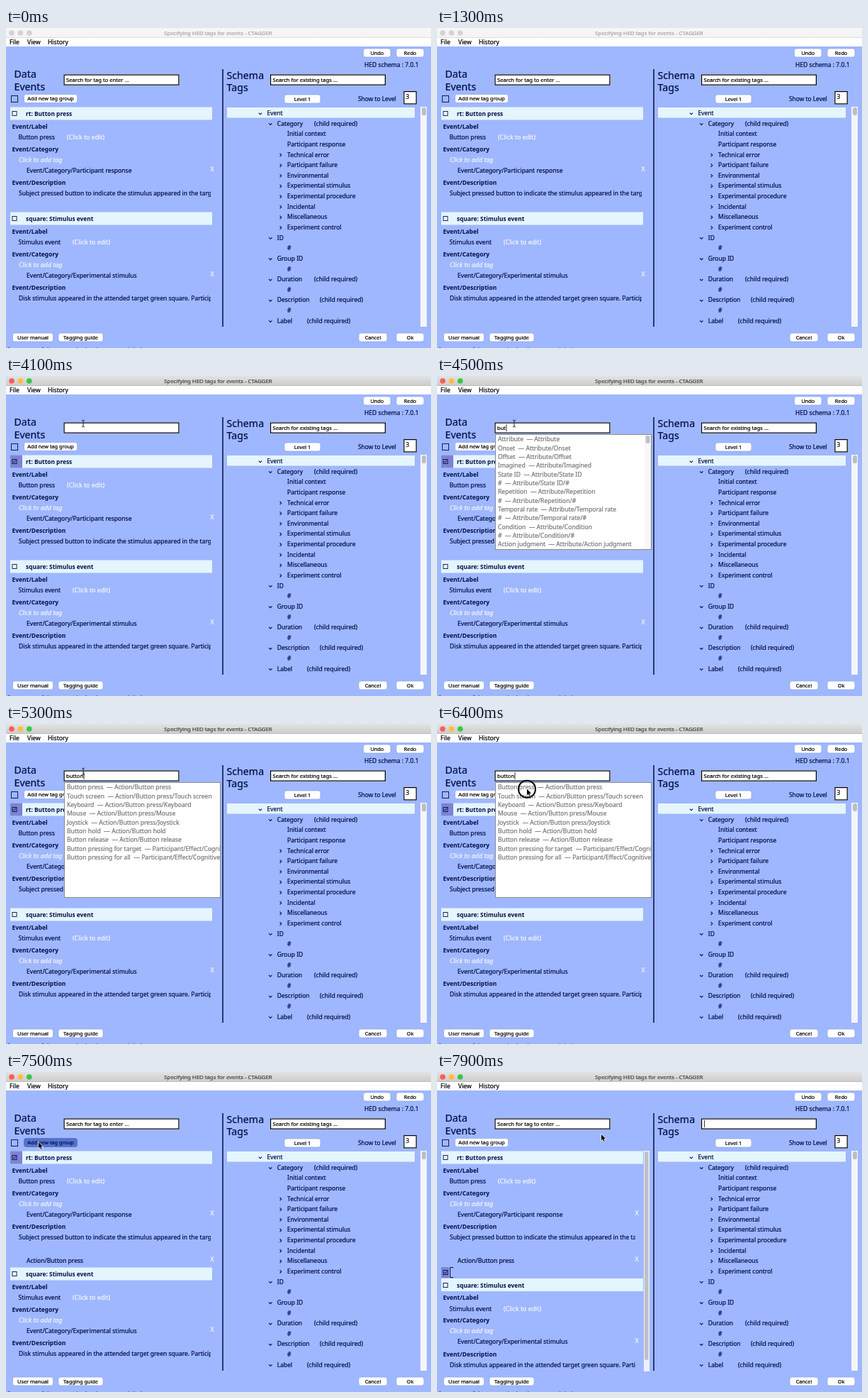
An HTML page with a canvas for the animation above (8 s loop, 600x451 px).

```html
<!DOCTYPE html>
<html lang="en">
<head>
<meta charset="utf-8">
<title>Tagging events</title>
<style>
html, body { margin: 0; width: 100%; height: 100%; overflow: hidden; background: #9fb7ff; }
canvas { display: block; }
</style>
</head>
<body>
<canvas id="stage" width="600" height="451"></canvas>
<script>
const ctx = document.getElementById('stage').getContext('2d');
const LOOP = 8000, STEP = 100;
const BLUE = '#9fb7ff', NAVY = '#000f48', PALE = '#e5f5fe', MARK = '#7d83d4', SOFT = '#f4f7ff';

// Moments in ms at which the interface changes
const AT = { active: 1900, check: 2000, focusLeft: 3300, popup: 4400, ripple: 6300,
             choose: 6500, press: 7500, group: 7600, focusRight: 7700 };
const TYPING = [[4200, 'b'], [4300, 'bu'], [4400, 'but'], [4700, 'butt'], [4900, 'butto'], [5000, 'button']];
const POINTER = [[1000, -30, 160], [1800, 12, 121], [2000, 12, 121], [2200, -5, 125], [2500, -5, 125],
                 [3200, 109, 67], [5300, 109, 67], [6100, 127, 91.7], [6800, 127, 91.7],
                 [7400, 46, 99], [7600, 46, 99], [7900, 232, 88]];

const twin = name => `${name}  — Attribute/${name}`;
const BROAD = ['Attribute  — Attribute',
  ...['Onset', 'Offset', 'Imagined', 'State ID'].map(twin),
  '#  — Attribute/State ID/#', twin('Repetition'), '#  — Attribute/Repetition/#',
  twin('Temporal rate'), '#  — Attribute/Temporal rate/#',
  twin('Condition'), '#  — Attribute/Condition/#', twin('Action judgment')];
const NARROW = ['Button press  — Action/Button press',
  ...['Touch screen', 'Keyboard', 'Mouse', 'Joystick'].map(n => `${n}  — Action/Button press/${n}`),
  'Button hold  — Action/Button hold', 'Button release  — Action/Button release',
  'Button pressing for target  — Participant/Effect/Cognitive',
  'Button pressing for all  — Participant/Effect/Cognitive'];

// Tree rows: depth, open state (v open, > closed, blank leaf), label, x of the note
const TREE = [[0, 'v', 'Event'], [1, 'v', 'Category', 435],
  [2, '', 'Initial context'], [2, '', 'Participant response'],
  ...['Technical error', 'Participant failure', 'Environmental', 'Experimental stimulus',
      'Experimental procedure', 'Incidental', 'Miscellaneous', 'Experiment control'].map(n => [2, '>', n]),
  [1, 'v', 'ID'], [2, '', '#'], [1, 'v', 'Group ID'], [2, '', '#'],
  [1, 'v', 'Duration', 435], [2, '', '#'], [1, 'v', 'Description', 443], [2, '', '#'], [1, 'v', 'Label', 425]];

// A hairline outline gives the glyphs a slightly heavier weight
function text(str, x, y, { size = 8.6, color = NAVY, style = '', align = 'left' } = {}) {
  ctx.font = `${style} ${size}px "Noto Sans", sans-serif`;
  ctx.fillStyle = ctx.strokeStyle = color;
  ctx.lineWidth = 0.22;
  ctx.textAlign = align;
  ctx.fillText(str, x, y + size * 0.36);
  if (style !== 'bold') ctx.strokeText(str, x, y + size * 0.36);
}

function rect(x, y, w, h, fill, stroke, width = 1) {
  if (fill) { ctx.fillStyle = fill; ctx.fillRect(x, y, w, h); }
  if (stroke) {
    ctx.strokeStyle = stroke;
    ctx.lineWidth = width;
    ctx.strokeRect(x + width / 2, y + width / 2, w - width, h - width);
  }
}

function rounded(x, y, w, h, r, fill, stroke) {
  ctx.beginPath();
  ctx.roundRect(x, y, w, h, r);
  ctx.fillStyle = fill;
  ctx.fill();
  if (stroke) { ctx.strokeStyle = stroke; ctx.lineWidth = 0.7; ctx.stroke(); }
}

function line(points, color, width) {
  ctx.beginPath();
  points.forEach(([x, y]) => ctx.lineTo(x, y));
  ctx.strokeStyle = color;
  ctx.lineWidth = width;
  ctx.stroke();
}

function disc(x, y, r, fill) {
  ctx.beginPath();
  ctx.arc(x, y, r, 0, 7);
  ctx.fillStyle = fill;
  ctx.fill();
}

function clipped(x, y, w, h, draw) {
  ctx.save();
  ctx.beginPath();
  ctx.rect(x, y, w, h);
  ctx.clip();
  draw();
  ctx.restore();
}

function button(label, x, y, w, { pressed, focus } = {}) {
  if (focus) rounded(x - 1, y - 1, w + 2, 14, 4, '#4d85e0');
  rounded(x, y, w, 12, 3, pressed ? '#5673cc' : '#fff', pressed ? '#4c66ba' : focus ? null : '#8fa4e4');
  text(label, x + w / 2, y + 6, { size: 7.3, color: pressed ? NAVY : '#000', align: 'center' });
}

function checkbox(x, y, size, checked) {
  rect(x, y, size, size, null, NAVY, 0.9);
  if (checked) line([[x + 1.6, y + 3.2], [x + 3, y + 5], [x + 5.4, y + 1.4]], NAVY, 0.9);
}

function field(x, value, caret) {
  rect(x - 0.5, 65.5, 163, 15.2, '#fff', '#000', 1.2);
  text(value, x + 3, 73, { size: 7.6, color: '#000' });
  if (caret) rect(x + 3.5 + (value ? ctx.measureText(value).width : 0), 68, 0.8, 10, '#000');
}

function windowFrame(active) {
  rect(0, 0, 600, 451, BLUE);
  const bar = ctx.createLinearGradient(0, 0, 0, 13);
  bar.addColorStop(0, active ? '#e2e2e2' : '#f6f6f6');
  bar.addColorStop(1, active ? '#cecece' : '#f4f4f4');
  rect(0, 0, 600, 14, bar);
  rect(0, 13, 600, 1, active ? '#bdbdbd' : '#dedede');
  const lights = active ? ['#fc5b57', '#fdbc40', '#34c84a'] : Array(3).fill('#d3d3d3');
  lights.forEach((color, i) => disc(8 + 12.4 * i, 7, 3.8, color));
  text('Specifying HED tags for events - CTAGGER', 299.5, 7, { size: 7.8, color: active ? '#444' : '#a5a5a5', align: 'center' });
  rect(0, 14, 600, 12, '#fff');
  [['File', 5], ['View', 30], ['History', 59]].forEach(([s, x]) => text(s, x, 20, { color: '#000' }));
  text('frequency of the events in the data set and their tags', 2, 454, { color: '#33467f' });
}

function leftHeader(t, typed) {
  text('Data', 11.5, 65, { size: 14.2 });
  text('Events', 11.5, 83, { size: 14.2 });
  checkbox(7, 95, 10);
  button('Add new tag group', 25.5, 93.5, 75, { pressed: t >= AT.press && t < AT.group });
  const focused = t >= AT.focusLeft && t < AT.choose;
  const caret = focused && (t < 3700 || t >= 4200);
  field(82, focused ? typed : 'Search for tag to enter ...', caret);
}

function eventGroup(y, event, checked, right) {
  rect(6, y - 9.5, 285, 18, PALE);
  if (checked) rect(6, y - 9.5, 17, 18, MARK);
  checkbox(8.5, Math.round(y - 4), 7, checked);
  text(event.title, 28, y, { size: 8.35, style: 'bold' });
  ['Event/Label', 'Event/Category', 'Event/Description'].forEach((s, i) =>
    text(s, 8.5, y + [17.7, 49.5, 97][i], { size: 8.45, style: 'bold' }));
  text(event.label, 17.5, y + 33);
  text('(Click to edit)', event.editX, y + 33, { size: 8.8, color: SOFT });
  text('Click to add tag', 18, y + 64.7, { size: 8.9, color: SOFT, style: 'italic' });
  tagRow(event.tag, y + 79.7, right);
  clipped(0, y, right - 2, 150, () => text(event.description, 18, y + 112, { size: 8.5 }));
}

function tagRow(tag, y, right) {
  text(tag, 29, y);
  text('X', right, y - 1.5, { size: 8.8, color: SOFT, align: 'center' });
}

function leftPanel(t) {
  const grouped = t >= AT.group, chosen = t >= AT.choose;
  const right = grouped ? 282 : 291;
  clipped(0, 108, 304, 314, () => {
    eventGroup(121, { title: 'rt: Button press', label: 'Button press', editX: 86,
      tag: 'Event/Category/Participant response',
      description: 'Subject pressed button to indicate the stimulus appeared in the target green square.' },
      t >= AT.check && !grouped, right);
    if (chosen) tagRow('Action/Button press', 265.5, right);
    if (grouped) {
      rect(6, 275, 11, 15, MARK);
      checkbox(8.5, 279, 7, true);
      line([[23, 275.5], [18.5, 275.5], [18.5, 289.5], [23, 289.5]], NAVY, 1);
    }
    eventGroup(grouped ? 300.5 : chosen ? 285 : 269, { title: 'square: Stimulus event', label: 'Stimulus event', editX: 94,
      tag: 'Event/Category/Experimental stimulus',
      description: 'Disk stimulus appeared in the attended target green square. Participant pressed button.' },
      false, right);
    if (grouped) {
      rect(292, 111, 8, 311, '#edf0f8');
      rounded(293, 112, 5.5, 294, 2.7, '#bfc1c6');
    }
  });
}

function chevron(x, y, open) {
  const points = open ? [[-2.2, -0.8], [0, 1.3], [2.2, -0.8]] : [[-1, -2.2], [1.2, 0], [-1, 2.2]];
  line(points.map(([dx, dy]) => [x + dx, y + dy + 0.5]), NAVY, 1.1);
}

function rightPanel(t) {
  const focused = t >= AT.focusRight;
  rect(305.3, 58, 1.5, 363, NAVY);
  text('Schema', 311.5, 67, { size: 14.2 });
  text('Tags', 311.5, 84, { size: 14.2 });
  field(373.5, focused ? '' : 'Search for existing tags ...', focused);
  text('HED schema : 7.0.1', 506, 52, { size: 8.55 });
  text('Show to Level', 497, 100, { size: 8.4 });
  rect(561.3, 89, 18.5, 18.5, '#fff', '#000', 1.2);
  text('3', 564.5, 97, { size: 8.2, color: '#000' });
  button('Level 1', 393, 94, 51);

  rect(312, 112, 265, 14.5, PALE);
  TREE.forEach(([depth, state, label, noteX], i) => {
    const x = 368.5 + 14.3 * depth, y = 120 + 14.63 * i;
    if (state) chevron(x - 9.5, y, state === 'v');
    text(label, x, y, { size: 8.5 });
    if (noteX) text('(child required)', noteX, y, { size: 8.6 });
  });
  rect(585, 111, 9, 310, '#f3f5fb');
  rounded(587, 112, 6, 11, 2.8, '#bcbec4');
}

function popup(typed) {
  const narrow = typed.length > 3;
  rect(82, 82, 221, 163, '#fff', '#8c8c8c');
  clipped(83, 83, 219, 161, () =>
    (narrow ? NARROW : BROAD).forEach((s, i) => text(s, 86, 89.2 + 12.33 * i, { color: '#787878' })));
  if (narrow) return;
  rect(293, 83, 9, 161, '#f7f7f7');
  rounded(294.5, 84, 6, 11, 3, '#c0c0c0');
}

function pointerAt(t) {
  const next = POINTER.findIndex(k => k[0] > t);
  if (next === 0) return POINTER[0].slice(1);
  if (next < 0) return POINTER.at(-1).slice(1);
  const [t0, x0, y0] = POINTER[next - 1], [t1, x1, y1] = POINTER[next];
  const u = (t - t0) / (t1 - t0), k = u * u * (3 - 2 * u);
  return [x0 + (x1 - x0) * k, y0 + (y1 - y0) * k];
}

function pointer(t) {
  const [x, y] = pointerAt(t);
  if (t >= AT.ripple && t < AT.choose) {
    ctx.beginPath();
    ctx.arc(x, y, 12, 0, 7);
    ctx.strokeStyle = '#000';
    ctx.lineWidth = 2;
    ctx.stroke();
  }
  if (x > 82 && x < 245 && y > 65 && y < 81) {
    line([[x, y - 4], [x, y + 4]], '#222', 1);
    for (const s of [-1, 1]) line([[x - 2, y + 5 * s], [x, y + 4 * s], [x + 2, y + 5 * s]], '#222', 0.9);
    return;
  }
  const outline = [[0, 0], [0, 8.5], [1.9, 6.8], [3.2, 9.8], [4.6, 9.2], [3.3, 6.3], [6, 6.1]];
  ctx.beginPath();
  outline.forEach(([dx, dy]) => ctx.lineTo(x + dx, y + dy));
  ctx.closePath();
  ctx.strokeStyle = '#fff';
  ctx.lineWidth = 1.2;
  ctx.stroke();
  ctx.fillStyle = '#000';
  ctx.fill();
}

function draw(t) {
  const typed = TYPING.filter(([at]) => at <= t).at(-1)?.[1] ?? '';
  windowFrame(t >= AT.active);
  button('Undo', 504.5, 29, 38.5, { focus: t >= AT.active && t < AT.focusLeft });
  button('Redo', 551, 29, 39);
  leftHeader(t, typed);
  leftPanel(t);
  rightPanel(t);
  button('User manual', 9.5, 430, 57);
  button('Tagging guide', 74, 430, 63);
  button('Cancel', 498, 430, 40);
  button('Ok', 551, 430, 39);
  if (t >= AT.popup && t < AT.choose) popup(typed);
  pointer(t);
}

function frame() {
  draw(Math.floor(performance.now() % LOOP / STEP) * STEP);
  requestAnimationFrame(frame);
}
frame();
</script>
</body>
</html>
```
